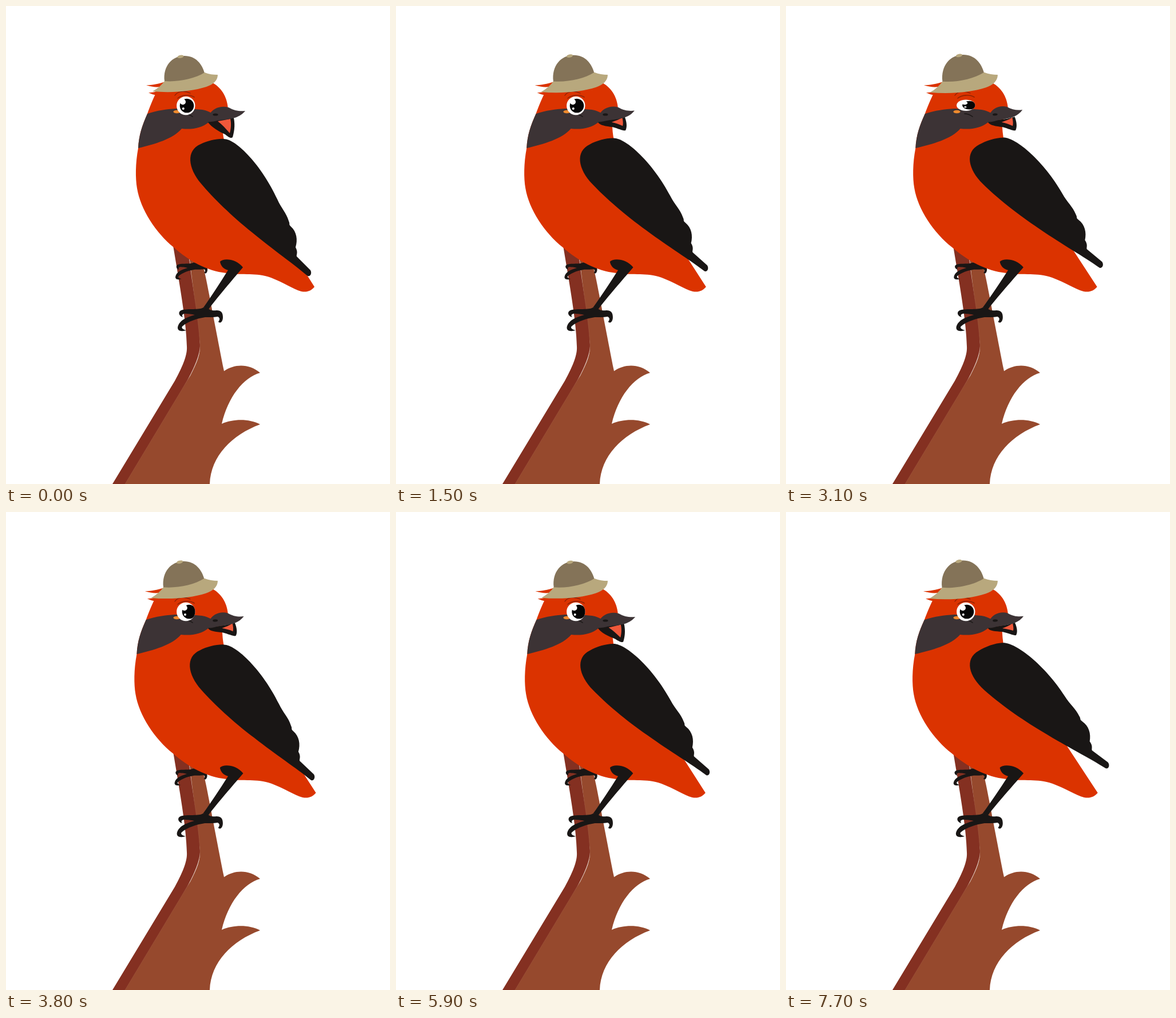
Animation, 671 px wide and 834 px high, one loop 7.8 s. Source, as an HTML page with a canvas:

```html
<!DOCTYPE html>
<html lang="en">
<head>
<meta charset="utf-8">
<title>Red bird</title>
<style>
html, body { margin: 0; width: 100%; height: 100%; overflow: hidden; background: #fff; }
canvas { display: block; width: 671px; height: 834px; }
</style>
</head>
<body>
<canvas id="stage"></canvas>
<script>
const W = 671, H = 834, LOOP = 7800, STEP = 100;
const canvas = document.getElementById('stage');
const ctx = canvas.getContext('2d');
const dpr = window.devicePixelRatio || 1;
canvas.width = W * dpr;
canvas.height = H * dpr;

const RED = '#db3300', BLACK = '#191615', MASK = '#3c3335';
const BARK = '#96492d', BARK_DARK = '#843021', TAN = '#b8a87d', DOME = '#847358';

const shape = {
  branch: new Path2D('M200 834 L322 645 C334 622 340 607 339 590 L320 435 L340 435 L346 460 C352 485 358 520 381 637 C400 624 425 624 444 640 C415 648 388 682 377 729 C398 720 425 720 444 730 C395 748 358 785 356 834Z'),
  shade: new Path2D('M186 834 L295 654 C311 625 317 607 316 594 C315 550 304 490 291 412 L320 440 C325 485 336 540 339 590 C340 607 328 633 317 653 L208 834Z'),
  seam: new Path2D('M322 455 C326 490 336 540 339 590 C340 607 328 633 317 653 L208 834'),
  body: new Path2D('M262 152 C255 166 251 177 247 188 C238 208 232 226 231 248 C226 275 226 300 229 318 C235 355 262 396 293 421 C320 445 350 462 385 466 C418 471 435 464 463 474 C484 482 502 494 516 498 C526 500 533 497 539 490 L487 408 L381 234 C379 225 378 215 378 203 L388 180 C387 162 379 144 361 134 L300 134Z'),
  tufts: new Path2D('M245 138 C256 138 266 136 278 132 L278 150 L264 156 C258 155 253 153 249 151 C257 151 261 150 266 147 L270 141 C262 142 254 141 245 138Z'),
  mask: new Path2D('M247 188 C265 182 280 180 297 179 C315 180 336 179 348 182 C354 184 358 186 361 188 L370 198 L354 203 C342 213 325 216 307 214 C292 232 260 241 231 248 C232 226 238 208 247 188Z'),
  bill: new Path2D('M355 190 C361 178 376 173 389 177 C399 183 409 184 418 183 C409 194 397 197 376 199 C366 200 360 203 352 202Z'),
  wing: new Path2D('M381 232 C402 232 447 278 474 337 C481 353 490 361 494 375 C497 382 493 380 498 385 C508 394 510 408 506 421 C511 430 507 434 508 437 L532 461 C535 466 532 473 527 471 C500 448 470 428 430 395 C395 367 362 335 341 310 C318 283 314 252 340 241 C352 235 370 231 381 232Z'),
  leg: new Path2D('M374 446 C380 439 403 441 414 456 C400 473 376 500 354 529 L345 526 C358 508 374 483 388 461 C380 459 375 453 374 446Z'),
  foot: new Path2D('M345 526 C338 531 318 527 306 531 C300 534 302 541 309 543 C306 538 310 536 316 537 C322 537 326 538 330 539 C315 543 302 549 300 561 C300 568 308 568 315 566 C309 564 306 562 308 559 C318 550 335 545 348 543 C358 543 366 543 370 542 C374 544 374 547 371 551 C375 555 379 550 379 543 C379 535 376 531 368 531 C360 532 355 530 354 528Z'),
  dome: new Path2D('M277 131 C274 105 290 87 312 87 C332 87 343 102 347 117 C330 128 300 134 277 132Z'),
  brim: new Path2D('M277 131 C300 133 330 127 347 116 C355 119 362 120 370 120 C370 130 362 137 350 141 C325 149 290 152 256 149 C265 144 272 138 277 131Z')
};

// Lower jaw: start point, then cubic segments; shut and open poses
const jawShut = [353,203, 357,199,380,200,400,193, 404,202,405,210,402,215, 399,216,390,212,378,209, 365,208,357,208,353,203];
const jawOpen = [353,203, 358,198,380,198,398,195, 401,210,398,222,396,229, 393,232,388,228,383,224, 372,219,360,212,353,203];
const tongueShut = [378,203, 385,200,391,198,396,194, 397,199,398,203,397,207, 391,205,385,204,378,203];
const tongueOpen = [370,201, 378,200,385,198,392,197, 394,205,393,215,391,222, 384,214,378,207,370,201];

// Motion tracks: [time, value] pairs
const stretchTrack = [[0,0],[1500,.48],[2700,1],[3150,.79],[4000,.34],[4500,.15],[4950,0],[5300,.08],[5900,.3],[6900,.66],[7700,1]];
const wingTrack = [[0,0],[1500,.36],[1600,.42],[2450,1.07],[3100,.62],[4000,0],[7700,1]];
const jawTrack = [[0,1],[400,.1],[1500,.15],[3100,.15],[4500,0],[5500,0],[5800,.9],[5900,.8],[6300,0],[7700,0]];
const billTrack = [[0,0],[1500,.25],[3100,1],[4500,0],[5900,0],[6900,.25],[7700,.6]];
const lidTrack = [[0,1],[2950,1],[3100,.6],[3200,.4],[3400,1],[6800,1],[6900,.85],[7000,.4],[7200,1],[7700,1]];
const gazeTrack = [[0,0],[2800,0],[3100,1],[4400,.8],[5900,.8],[6400,0],[7700,0]];

const mix = (a, b, k) => a + (b - a) * k;

function at(track, t) {
  for (let i = 1; i < track.length; i++) {
    const [t0, a] = track[i - 1], [t1, b] = track[i];
    if (t <= t1) return mix(a, b, (t - t0) / (t1 - t0));
  }
  return track[track.length - 1][1];
}

function fill(path, color) {
  ctx.fillStyle = color;
  ctx.fill(path);
}

function oval(x, y, rx, ry, color, turn = 0) {
  ctx.beginPath();
  ctx.ellipse(x, y, rx, ry, turn, 0, Math.PI * 2);
  ctx.fillStyle = color;
  ctx.fill();
}

function line(d, color, width) {
  ctx.strokeStyle = color;
  ctx.lineWidth = width;
  ctx.lineCap = 'round';
  ctx.stroke(new Path2D(d));
}

function morph(a, b, k, color) {
  const p = a.map((v, i) => mix(v, b[i], k));
  ctx.beginPath();
  ctx.moveTo(p[0], p[1]);
  for (let i = 2; i < p.length; i += 6) ctx.bezierCurveTo(...p.slice(i, i + 6));
  ctx.fillStyle = color;
  ctx.fill();
}

// Draw inside a scale around (x, y)
function scaled(x, y, sx, sy, draw) {
  ctx.save();
  ctx.translate(x, y);
  ctx.scale(sx, sy);
  ctx.translate(-x, -y);
  draw();
  ctx.restore();
}

function drawBranch() {
  fill(shape.branch, BARK);
  fill(shape.shade, BARK_DARK);
  line('M200 834', BARK, 1);
  ctx.strokeStyle = 'rgba(170,105,80,.45)';
  ctx.lineWidth = .8;
  ctx.stroke(shape.seam);
}

function drawBackFoot() {
  ctx.save();
  ctx.translate(296, 449);
  ctx.scale(.71, .72);
  ctx.translate(-300, -528);
  fill(shape.foot, BLACK);
  ctx.restore();
}

function drawWing(t) {
  ctx.save();
  ctx.translate(350, 255);
  ctx.rotate(-at(wingTrack, t) * .125);
  ctx.translate(-350, -255);
  fill(shape.wing, BLACK);
  ctx.restore();
}

function drawBill(t) {
  const jaw = at(jawTrack, t), lift = at(billTrack, t);
  morph(jawShut, jawOpen, jaw, BLACK);
  morph(tongueShut, tongueOpen, jaw, '#f0583a');
  ctx.save();
  ctx.translate(358, 190);
  ctx.rotate(-lift * .035);
  ctx.scale(1 - lift * .075, 1);
  ctx.translate(-358, -190);
  fill(shape.bill, MASK);
  oval(366, 189.5, 4.6, 2.1, BLACK);
  ctx.restore();
}

function drawEye(t) {
  const lid = at(lidTrack, t), look = at(gazeTrack, t) * 4.5;
  line('M295 156 C300 149 310 147 322 152', '#7c1f08', 1.2);
  line('M300 161 C307 155 321 154 329 159', '#8f2403', 1.6);
  line('M312 188 C318 188 322 190 326 193', BLACK, 1.5);
  oval(298.5, 184.5, 6, 2.8, '#ee8a2d');
  scaled(314, 172, 1, lid, () => {
    oval(314.3, 174, 16.2, 16.3, '#fff');
    ctx.save();
    ctx.clip();
    oval(316 + look, 174, 12.3, 12.3, '#050505');
    oval(309 + look * .7, 167.3, 5, 5, '#fff');
    oval(309.8 + look * .8, 179, 2, 2, '#fff');
    ctx.restore();
  });
}

function drawHat(k) {
  scaled(371, 120, 1 + k * .047, 1 + k * .073, () => {
    fill(shape.dome, DOME);
    fill(shape.brim, TAN);
    oval(305, 88.3, 5.5, 2.6, TAN, -.2);
  });
}

function render(t) {
  const k = at(stretchTrack, t);
  ctx.setTransform(dpr, 0, 0, dpr, 0, 0);
  ctx.fillStyle = '#fff';
  ctx.fillRect(0, 0, W, H);
  drawBranch();
  scaled(385, 300, 1 + k * .037, 1, () => {
    drawBackFoot();
    fill(shape.tufts, RED);
    fill(shape.body, RED);
    fill(shape.mask, MASK);
    drawWing(t);
    fill(shape.leg, BLACK);
    fill(shape.foot, BLACK);
  });
  drawBill(t);
  drawEye(t);
  drawHat(k);
}

let start;
function tick(now) {
  if (start === undefined) start = now;
  const t = (now - start) % LOOP;
  render(Math.floor(t / STEP) * STEP);
  requestAnimationFrame(tick);
}
render(0);
requestAnimationFrame(tick);
</script>
</body>
</html>
```
